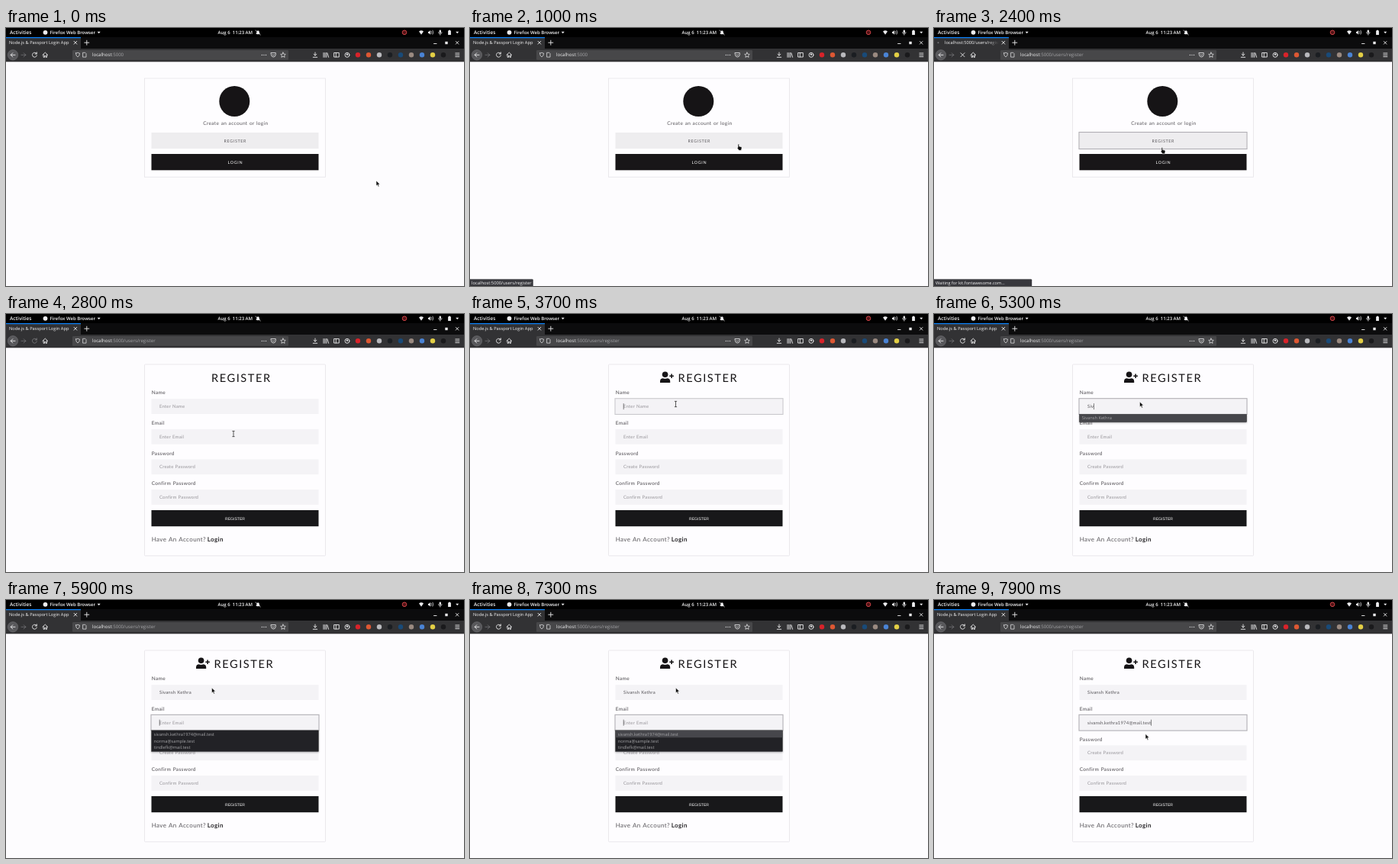
An HTML page for the animation above (8 s loop, 600 px wide and 338 px high).

```html
<!DOCTYPE html>
<html lang="en">
<head>
<meta charset="utf-8">
<title>Registration walkthrough</title>
<style>
html, body { margin: 0; width: 100%; height: 100%; overflow: hidden; background: #fdfcfe; }
svg { display: block; width: 100%; height: 100%; }
text { font-family: "Open Sans", "Noto Sans", sans-serif; font-size: 5.7px; fill: #f4f4f5; text-rendering: geometricPrecision; white-space: pre; }
.bar { font-weight: 600; font-size: 6px; }
.url { font-size: 6.1px; }
.dim { fill: #a3a3a6; }
.page text { font-family: Lato, "Open Sans", sans-serif; letter-spacing: .34px; word-spacing: .4px; font-size: 6.5px; fill: #59575b; }
.page .field { font-size: 6px; letter-spacing: .17px; }
.page .hint { fill: #98969b; }
.page .btn { font-size: 5.4px; letter-spacing: .65px; text-anchor: middle; }
.page .title { font-size: 14.6px; letter-spacing: 1.55px; fill: #161416; }
.page .note { font-size: 8px; letter-spacing: .4px; }
.page .submit { font: 5.1px "Liberation Sans", Arial, sans-serif; letter-spacing: 0; word-spacing: 0; text-anchor: middle; }
.page .white { fill: #fff; }
.card { fill: #fefdff; stroke: #e5e3e8; stroke-width: .8; }
.input { fill: #f4f3f6; }
.ring { fill: none; stroke: #b0aeb3; stroke-width: 1.1; }
.caret { stroke: #333; stroke-width: .6; }
.popup { fill: #222225; stroke: #39393d; stroke-width: .4; }
.line { fill: none; stroke: #ececee; stroke-width: .9; stroke-linecap: round; stroke-linejoin: round; }
.solid { fill: #ececee; }
.status { fill: #38383d; stroke: #25252a; stroke-width: .4; }
.pointer path { fill: #0b0b0b; stroke: #fff; stroke-width: .55; stroke-linejoin: round; }
.pointer .beam { fill: none; stroke: #333; stroke-width: .8; }
</style>
</head>
<body>
<svg viewBox="0 0 600 338" preserveAspectRatio="none">
  <defs>
    <linearGradient id="fade" gradientUnits="userSpaceOnUse" x1="70" x2="85" y1="0" y2="0">
      <stop stop-color="#f4f4f5"/><stop offset="1" stop-color="#f4f4f5" stop-opacity="0"/>
    </linearGradient>
    <filter id="shadow" x="-5%" y="-20%" width="110%" height="160%">
      <feDropShadow dx="0" dy="1" stdDeviation="1.2" flood-opacity=".3"/>
    </filter>
  </defs>
  <rect width="600" height="338" fill="#fdfcfe"/>

  <!-- desktop bar -->
  <rect width="600" height="13" fill="#000"/>
  <text class="bar" x="5" y="8.2" style="font-size:6.5px">Activities</text>
  <circle class="solid" cx="51.5" cy="5.8" r="2.9"/>
  <text class="bar" x="57.5" y="8.1">Firefox Web Browser</text>
  <path class="solid" d="M119.7 4.8h4l-2 2.5z"/>
  <text class="bar" x="277.5" y="8.1">Aug 6  11:23 AM</text>
  <path class="solid" d="M327.3 8q1-1 1-2.6q0-2 1.8-2.2q1.8.2 1.8 2.2q0 1.6 1 2.6zM329.4 8.4h1.4l-.7.8z"/>
  <path class="line" d="M327 3l6.3 6" style="stroke-width:.7"/>
  <circle cx="522" cy="5.8" r="2.8" fill="#501215" stroke="#d04448"/>
  <path class="solid" d="M541 4.4q3-2.4 6 0l-3 4.3z"/>
  <path class="solid" d="M553 4.8h1.3l1.8-1.7v5.6l-1.8-1.7H553z"/>
  <path class="line" d="M557.5 4.3q1 1.5 0 3m1.5-4.2q1.8 2.6 0 5.2" style="stroke-width:.7"/>
  <rect class="solid" x="567.6" y="2.6" width="2.4" height="4" rx="1.2"/>
  <path class="line" d="M566.5 5.7q0 2 2.3 2q2.300 0 2.300-2m-2.300 2v1.500" style="stroke-width:.7"/>
  <path class="solid" d="M580 2.700h2v.7h.9v5.700h-3.800V3.400h.9z"/>
  <path class="solid" d="M589.200 4.800h4l-2 2.500z"/>

  <!-- tabs -->
  <rect y="12" width="600" height="15" fill="#0c0c0d"/>
  <rect y="12" width="98" height="15" fill="#323234"/>
  <rect y="12" width="98" height="1.200" fill="#0a84ff"/>
  <text x="4" y="21.300" data-show="0-2200 2500-8000">Node.js &amp; Passport Login App</text>
  <g data-show="2200-2500">
    <circle cx="5.500" cy="19.200" r="1" fill="#77777b"/>
    <text x="14" y="21.300" style="fill:url(#fade)">localhost:5000/users/register</text>
  </g>
  <path class="line" d="M89 17.300l3.800 3.800m0-3.800l-3.800 3.800M102.800 19.200h6m-3-3v6M560.500 20.500h3.500M589.300 17.500l3.600 3.600m0-3.600l-3.600 3.600"/>
  <rect class="solid" x="575.300" y="17.800" width="3.400" height="3.400"/>

  <!-- toolbar -->
  <rect y="27" width="600" height="17.300" fill="#323234"/>
  <rect x="87" y="29" width="283" height="12.700" rx="1.200" fill="#474749"/>
  <circle cx="9" cy="35.300" r="6.700" fill="#58585b" stroke="#77777a" stroke-width=".5"/>
  <path class="line" d="M12 35.300H6.200m2.600-2.600l-2.600 2.600l2.600 2.600"/>
  <path class="line" d="M20 35.300h5.800m-2.600-2.600l2.600 2.600l-2.600 2.600" opacity=".3"/>
  <g data-show="0-2200 3400-8000"><path class="line reload" d="M40 33.500a3 3 0 1 0 .4 2.500m-.1-4.200v2.200h-2.200"/></g>
  <g data-show="2500-3400" ><path class="line" opacity=".35" d="M40 33.500a3 3 0 1 0 .4 2.500m-.1-4.200v2.200h-2.200"/></g>
  <path class="line" data-show="2200-2500" d="M35 32.700l5 5m0-5l-5 5"/>
  <path class="line" d="M48 35.300l3.300-3.200l3.300 3.200m-5.500-.6v3.600h1.500v-2h1.400v2h1.500v-3.600"/>
  <path class="line" d="M91.500 33q1.500 0 2.500-.8q1 .8 2.500.8q0 3.800-2.500 5q-2.500-1.200-2.500-5zM101 32.300h2.800l1.200 1.200v4.600h-4z" style="stroke-width:.7"/>
  <text class="url" x="113" y="37.400">localhost<tspan class="dim">:5000<tspan id="path"></tspan></tspan></text>
  <path class="line" d="M335.300 35.300h.1m2.500 0h.1m2.500 0h.1" style="stroke-width:1.300"/>
  <path class="line" d="M347.300 32.500h6v2.500q-.5 3-3 3t-3-3zM348.800 34.600l1.500 1.400l1.500-1.400" style="stroke-width:.8"/>
  <path class="line" d="M363 32l1 2.200l2.300.2l-1.700 1.600l.5 2.400l-2.100-1.200l-2.100 1.200l.5-2.400l-1.700-1.600l2.300-.2z" style="stroke-width:.7"/>
  <path class="line" d="M405 32v4m-1.900-1.800l1.900 1.900l1.900-1.900M402.300 38.300h5.400M416 32.500v5.800m1.900-5.800v5.800m1.900-5.800v5.800m1.100-5.500l1.700 5.500M430 32.500h6.300v5.500H430zM432.300 32.500v5.500M588.800 33h5m-5 2.300h5m-5 2.300h5"/>
  <circle class="line" cx="447" cy="35.300" r="3"/>
  <circle class="solid" cx="447" cy="34.600" r="1.200"/>
  <g id="addons"></g>

  <!-- landing page -->
  <g class="page" data-show="0-2500">
    <rect class="card" x="181.500" y="66" width="237" height="129.200"/>
    <circle cx="299.300" cy="96" r="20" fill="#161416"/>
    <text x="258.300" y="127.300">Create an account or login</text>
    <rect x="190.500" y="137" width="219" height="21" fill="#eeedef"/>
    <rect class="ring" x="190" y="136.500" width="220" height="22" data-show="2100-2500"/>
    <text class="btn" x="300.300" y="149.500">REGISTER</text>
    <rect x="190.500" y="165" width="219" height="21.300" fill="#181618"/>
    <text class="btn white" x="300.300" y="177.600">LOGIN</text>
  </g>

  <!-- registration form -->
  <g class="page" data-show="2500-8000">
    <rect class="card" x="181.500" y="66" width="237" height="250.800" rx="1"/>
    <g data-show="3000-8000" fill="#161416">
      <circle cx="255.600" cy="79.300" r="3.800"/>
      <path d="M249 90v-1.800q0-3.900 4-3.900q2.600 1 5.200 0q4 0 4 3.900V90zM263.300 78.500h1.600v2h2v1.600h-2v2h-1.600v-2h-2v-1.600h2z"/>
    </g>
    <text class="title" x="269" y="88.500" data-show="2500-3000">REGISTER</text>
    <text class="title" x="272.500" y="88.500" data-show="3000-8000">REGISTER</text>
    <g id="fields"></g>
    <rect class="ring" x="190" y="110.700" width="220" height="20.800" data-show="3600-5700" data-fade="300"/>
    <rect class="ring" x="190" y="150.300" width="220" height="20.800" data-show="5700-8000" data-fade="200"/>
    <text class="field hint" x="201" y="123.200" data-show="2500-4300">Enter Name</text>
    <text class="field hint" x="201" y="162.800" data-show="2500-7400">Enter Email</text>
    <text class="field" id="name" x="201" y="123.200"></text>
    <text class="field" id="email" x="201" y="162.800"></text>
    <path class="caret" id="caret" d="M0 0v8"/>
    <rect x="190.500" y="257" width="219" height="21.200" fill="#18181a"/>
    <text class="submit white" x="300" y="269.500">REGISTER</text>
    <text class="note" x="190.700" y="297.700">Have An Account?</text>
    <text class="note" x="263.700" y="297.700" style="font-weight:700;fill:#2b292c">Login</text>
  </g>

  <!-- suggestion lists -->
  <g data-show="4400-5500">
    <rect class="popup" filter="url(#shadow)" x="190.500" y="131.500" width="219" height="10"/>
    <rect x="190.700" y="131.700" width="218.600" height="9.600" fill="#46464b" data-show="5200-5500" data-fade="200"/>
    <text class="dim" x="193.700" y="138.300">Sivansh Kethra</text>
  </g>
  <g data-show="5900-7400">
    <rect class="popup" filter="url(#shadow)" x="190.500" y="170.800" width="219" height="27.700"/>
    <rect x="190.700" y="171" width="218.600" height="9.200" fill="#46464b" data-show="7200-7400"/>
    <text class="dim" x="193.700" y="177.700">sivansh.kethra1974@mail.test</text>
    <text class="dim" x="193.700" y="186.500">norma@sample.test</text>
    <text class="dim" x="193.700" y="195.300">tindlefk@mail.test</text>
  </g>

  <!-- link status -->
  <g data-show="900-2300" data-fade="200">
    <path class="status" d="M0 329.200h81.500q1 0 1 1V338H0z"/>
    <text x="2" y="335.600" style="font-size:5.800px">localhost:5000/users/register</text>
  </g>
  <g data-show="2300-2500">
    <path class="status" d="M0 329.200h127q1 0 1 1V338H0z"/>
    <text x="2" y="335.600" style="font-size:5.600px">Waiting for kit.fontawesome.com...</text>
  </g>

  <g class="pointer" id="pointer">
    <path data-show="0-500 4400-7500 7800-8000" d="M0 0v6.800l1.600-1.400l1.100 2.500l1.200-.5l-1.100-2.500l2.100-.1z"/>
    <path data-show="500-2500" d="M0 .8q.8-1.400 1.600 0v2.300l2.800.6q.8.300.6 1.500l-.6 3.100H1.200L-.900 5.200q-.2-1.200.9-.6z"/>
    <path class="beam" data-show="2500-4400 7500-7800" d="M-1.600-3.600h3.200M0-3.600v7.200m-1.600 0h3.200"/>
  </g>
</svg>

<script>
const LOOP = 8000, STEP = 100;
const $ = id => document.getElementById(id);

const labels = ["Name", "Email", "Password", "Confirm Password"];
const hints = ["", "", "Create Password", "Confirm Password"];
$("fields").innerHTML = labels.map((label, i) => {
  const y = 111.2 + i * 39.6;
  return `<text x="190.700" y="${y - 5.9}" style="font-weight:500">${label}</text>
    <rect class="input" x="190.500" y="${y}" width="219" height="19.800"/>
    <text class="field hint" x="201" y="${y + 12}">${hints[i]}</text>`;
}).join("");

const addons = ["#d8232a", "#de5833", "#b9b9bd", "#1b1e22", "#194a78", "#9a8a80", "#4a83d4", "#e3cf45", "#1a1a1c"];
$("addons").innerHTML = addons.map((color, i) =>
  `<circle cx="${461 + i * 14}" cy="35.300" r="3.200" fill="${color}"/>`).join("");

const track = [
  [100, 485, 200], [200, 483, 203], [300, 465, 199], [400, 430, 186], [500, 392, 169], [600, 362, 156], [700, 351, 152],
  [1500, 351, 152], [1800, 319, 154], [2000, 298, 156], [2800, 298, 157], [2900, 293, 150], [3200, 269.5, 118],
  [4300, 269.5, 118], [4400, 269.5, 115], [7400, 269.5, 115], [7900, 277, 175.5]
];
const nameTyping = [[0, ""], [4300, "S"], [4600, "Si"], [4800, "Siv"], [5500, "Sivansh Kethra"]];
const emailTyping = [[0, ""], [7400, "sivansh.kethra1974@mail.test"]];

const timed = [...document.querySelectorAll("[data-show]")].map(el => ({
  el,
  fade: +el.dataset.fade || STEP,
  spans: el.dataset.show.split(" ").map(span => span.split("-").map(Number))
}));

const latest = (list, t) => list.filter(([start]) => start <= t).pop()[1];

function position(t) {
  const next = track.findIndex(([time]) => time >= t);
  if (next < 1) return track[0].slice(1);
  const [t0, x0, y0] = track[next - 1], [t1, x1, y1] = track[next];
  const k = (t - t0) / (t1 - t0);
  return [x0 + (x1 - x0) * k, y0 + (y1 - y0) * k];
}

function render(t) {
  for (const { el, fade, spans } of timed) {
    const span = spans.find(([from, to]) => t >= from && t < to);
    el.style.display = span ? "" : "none";
    if (span) el.style.opacity = Math.min(1, (t - span[0] + STEP) / fade);
  }
  $("path").textContent = t < 2200 ? "" : "/users/register";
  $("name").textContent = latest(nameTyping, t);
  $("email").textContent = latest(emailTyping, t);

  const inEmail = t >= 5700;
  const field = $(inEmail ? "email" : "name");
  const width = field.textContent ? field.getComputedTextLength() : 0;
  $("caret").setAttribute("transform", `translate(${201.2 + width} ${inEmail ? 156.7 : 117.1})`);
  $("caret").style.display = t >= 3700 && (t < 6900 || t >= 7200) ? "" : "none";
  $("pointer").setAttribute("transform", `translate(${position(t)})`);
}

const start = performance.now();
function tick() {
  const elapsed = (performance.now() - start) % LOOP;
  render(Math.floor(elapsed / STEP) * STEP);
  requestAnimationFrame(tick);
}
tick();
</script>
</body>
</html>
```
